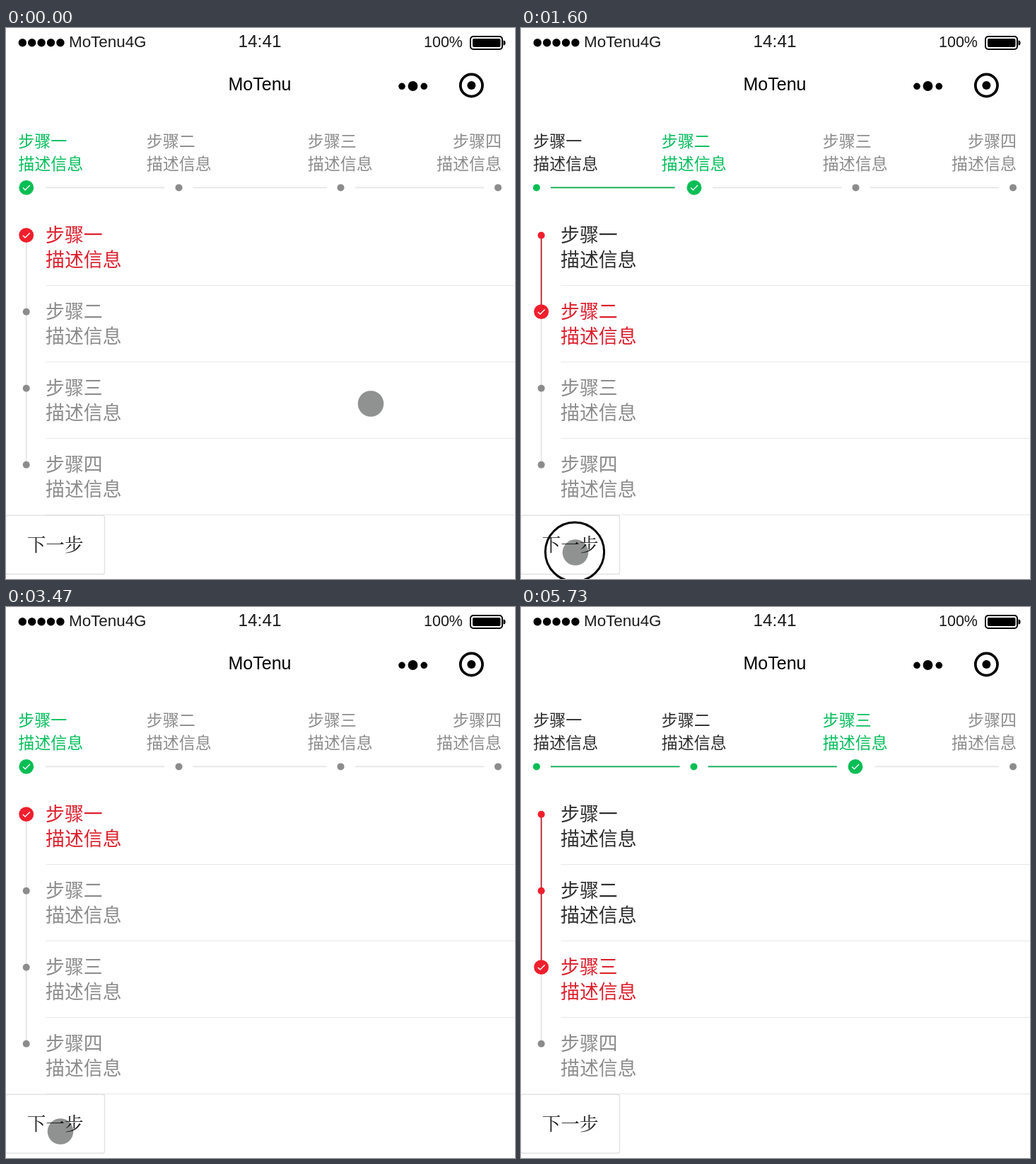
An HTML page with a canvas for the animation above (5.79 s loop, 720x778 px).

```html
<!DOCTYPE html>
<html lang="zh-CN">
<head>
<meta charset="utf-8">
<title>Steps</title>
<style>
html, body { margin: 0; width: 100%; height: 100%; overflow: hidden; background: #fff; }
canvas { display: block; width: 720px; height: 778px; }
</style>
</head>
<body>
<canvas id="stage" width="720" height="778"></canvas>
<script>
const ctx = document.getElementById('stage').getContext('2d');
const LOOP = 5790;
const LATIN = '"Liberation Sans", Arial, sans-serif';
const CJK = '"Noto Sans CJK SC", "Noto Sans CJK", sans-serif';
const SONG = '"Noto Serif CJK SC", "Noto Sans CJK SC", serif';
const DARK = '#2e2e2e', GRAY = '#8c8c8c', RULE = '#e6e6e6';
const GREEN = { dot: '#06be54', text: '#06be5c', line: '#16ad57' };
const RED = { dot: '#f01f2d', text: '#dc1f2d', line: '#b72c38' };

const STEPS = ['步骤一', '步骤二', '步骤三', '步骤四'];
const INFO = '描述信息';
const TAPS = [870, 1590, 2350, 3110, 3865, 4620];
const RING_END = 130, HOVER_START = 60, HOVER_END = 200;
const POINTER_END = 5300;

function text(str, x, y, size, family, color, align = 'left') {
  ctx.font = `${size}px ${family}`;
  ctx.textAlign = align;
  ctx.fillStyle = color;
  ctx.fillText(str, x, y);
}

function disc(x, y, r, color) {
  ctx.fillStyle = color;
  ctx.beginPath();
  ctx.arc(x, y, r, 0, Math.PI * 2);
  ctx.fill();
}

function ring(x, y, r, width) {
  ctx.strokeStyle = '#000';
  ctx.lineWidth = width;
  ctx.beginPath();
  ctx.arc(x, y, r, 0, Math.PI * 2);
  ctx.stroke();
}

function bar(x, y, w, h, color) {
  ctx.fillStyle = color;
  ctx.fillRect(x, y, w, h);
}

function roundBox(x, y, w, h, r) {
  ctx.beginPath();
  ctx.roundRect(x, y, w, h, r);
}

function check(x, y, color) {
  disc(x, y, 10.4, color);
  ctx.strokeStyle = '#fff';
  ctx.lineWidth = 1.4;
  ctx.beginPath();
  ctx.moveTo(x - 4.8, y + 0.2);
  ctx.lineTo(x - 1.6, y + 3.3);
  ctx.lineTo(x + 5, y - 3.3);
  ctx.stroke();
}

const labelColor = (i, active, theme) =>
  i < active ? DARK : i === active ? theme.text : GRAY;

function marker(x, y, i, active, theme) {
  if (i === active) check(x, y, theme.dot);
  else disc(x, y, 5, i < active ? theme.dot : GRAY);
}

function drawStatus() {
  for (let i = 0; i < 5; i++) disc(23.3 + i * 13.4, 20.7, 5.7, '#000');
  text('MoTenu4G', 89, 27, 22.4, LATIN, '#1a1a1a');
  text('14:41', 359, 27, 24.4, LATIN, '#1a1a1a', 'center');
  text('100%', 591, 27, 21.5, LATIN, '#1a1a1a');

  ctx.strokeStyle = '#000';
  ctx.lineWidth = 2;
  roundBox(657, 12, 45, 18, 4);
  ctx.stroke();
  ctx.fillStyle = '#000';
  roundBox(660, 15, 39.5, 12, 2);
  ctx.fill();
  roundBox(703.5, 17.5, 3, 7, [0, 3, 3, 0]);
  ctx.fill();

  text('MoTenu', 359, 88, 25, LATIN, '#000', 'center');
  disc(560, 82.3, 4.8, '#000');
  disc(575.5, 82, 6.9, '#000');
  disc(591.3, 82.3, 4.8, '#000');
  ring(658.4, 81, 15.6, 3.8);
  disc(658.4, 81, 6, '#000');
}

function drawRow(active) {
  const labelX = [17.3, 198.8, 426.8, 701];
  const dotX = [22, 244.5, 473.5, 696];
  const checkX = [28.8, 245, 473, 689];
  const starts = [42, 264.5, 494], ends = [224.5, 453.5, 676];

  STEPS.forEach((name, i) => {
    const color = labelColor(i, active, GREEN);
    const align = i === 3 ? 'right' : 'left';
    text(name, labelX[i], 168, 23, CJK, color, align);
    text(INFO, labelX[i], 200, 23, CJK, color, align);
    marker(i === active ? checkX[i] : dotX[i], 225.4, i, active, GREEN);
  });

  // The larger check icon pushes the neighbouring lines away.
  starts.forEach((from, i) => {
    if (i === active) from += i ? 6.7 : 14;
    const to = ends[i] - (i + 1 !== active ? 0 : i === 2 ? 14 : 6.7);
    bar(from, 224.4, to - from, 1.9, i < active ? GREEN.line : RULE);
  });
}

function drawColumn(active) {
  const x = 28.7, top = 292.7, pitch = 108;
  for (let i = 0; i < 3; i++) {
    bar(x - 0.95, top + i * pitch, 1.9, pitch, i < active ? RED.line : RULE);
  }
  STEPS.forEach((name, i) => {
    const y = top + i * pitch;
    const color = labelColor(i, active, RED);
    marker(x, y, i, active, RED);
    text(name, 56, y + 9.3, 26.9, CJK, color);
    text(INFO, 56, y + 44.3, 26.9, CJK, color);
    bar(56.5, y + 70.3, 664, 1, '#e8e8e8');
  });
}

function drawButton(pressed) {
  ctx.fillStyle = pressed ? '#dedede' : '#fff';
  ctx.strokeStyle = '#e2e2e2';
  ctx.lineWidth = 1.5;
  roundBox(-0.5, 688.3, 140, 83, 3);
  ctx.fill();
  ctx.stroke();
  text('下一步', 69.6, 739, 26.6, SONG, '#202020', 'center');
}

function pointerAt(t) {
  const u = Math.min(Math.max((t - 40) / 690, 0), 1);
  const glide = u * u * (3 - 2 * u);
  const settle = Math.min(Math.max((t - 730) / 130, 0), 1);
  return [516 - 420 * glide - 19 * settle, 530.5 + 210 * glide];
}

function render(t) {
  const taps = TAPS.filter(tap => t >= tap + RING_END).length;
  const within = (from, to) => TAPS.some(tap => t >= tap + from && t < tap + to);

  bar(0, 0, 720, 778, '#fff');
  drawStatus();
  drawRow(taps % 4);
  drawColumn(taps % 4);
  drawButton(within(HOVER_START, HOVER_END));

  if (t < POINTER_END) {
    const [x, y] = pointerAt(t);
    disc(x, y, 18.3, 'rgba(0, 5, 3, 0.435)');
  }
  if (within(0, RING_END)) ring(76, 739.7, 41.6, 3);
}

function tick() {
  render(performance.now() % LOOP);
  requestAnimationFrame(tick);
}
tick();
</script>
</body>
</html>
```
